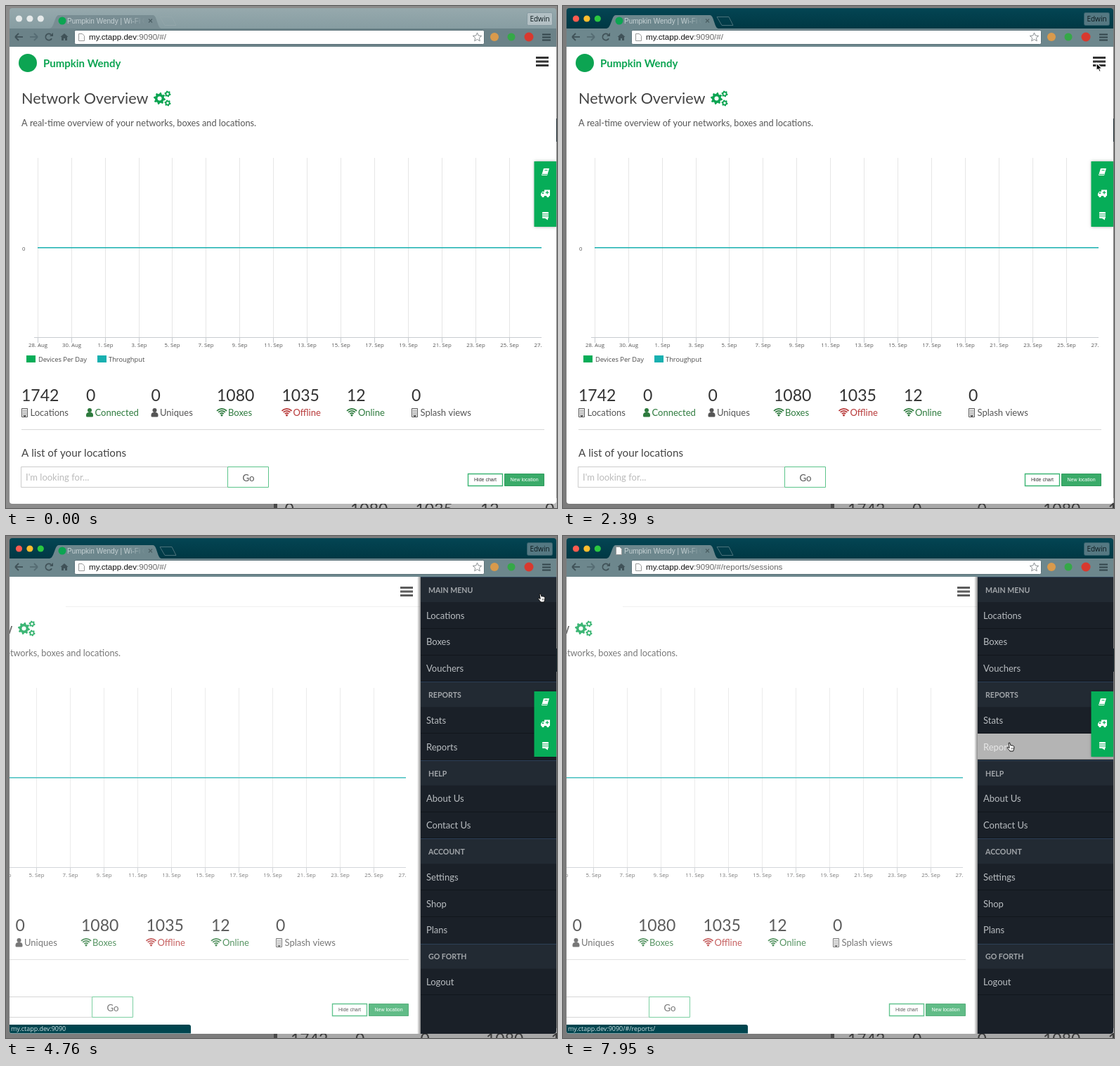
Recreate the animation shown at these times as an HTML page with a canvas. Size 784 by 714 pixels, loop 8000 ms.

```html
<!DOCTYPE html>
<html lang="en">
<head>
<meta charset="utf-8">
<title>Network Overview</title>
<style>
html, body { margin: 0; width: 100%; height: 100%; overflow: hidden; background: #8a8a8a; }
canvas { display: block; width: 784px; height: 714px; }
</style>
</head>
<body>
<canvas id="stage" width="784" height="714"></canvas>
<script>
const ctx = document.getElementById('stage').getContext('2d');
const LOOP = 8000;
const GREEN = '#0ca452', BRIGHT = '#06ad58', TEAL = '#18b0b0';
const LATO = 'Lato, sans-serif', OPEN = '"Open Sans", sans-serif';
const SANS = '"Liberation Sans", Arial, sans-serif';
const BRAND = 'Pumpkin Wendy';
const HOST = 'my.ctapp.dev', PORT = ':9090';

// Stepped timelines: [start ms, value]
const cursorSteps = [
  [0, null], [560, [771, 36, 'arrow']], [750, [764, 52, 'arrow']], [940, [760, 65, 'arrow']],
  [1150, [760, 72, 'arrow']], [1330, [760, 77, 'arrow']], [1700, [759, 81, 'arrow']],
  [3610, [762, 88, 'hand']], [5000, [722, 104, 'hand']], [5250, [688, 116, 'hand']],
  [5500, [672, 140, 'hand']], [5760, [662, 253, 'hand']], [6000, [656, 263, 'hand']],
  [6180, [646, 274, 'hand']], [6450, [637, 300, 'hand']]
];
const slideSteps = [[0, 0], [4490, 57], [4760, 193]];
const statusSteps = [[0, ''], [3930, HOST + PORT], [5250, HOST + PORT + '/#/'], [6000, HOST + PORT + '/#/reports/']];
const backSteps = [[0, 190], [400, null], [1330, 383]];
const rowSteps = {
  Locations: [[5250, '#2b2f38'], [5500, '#b0b0b0'], [5760, '#a0a0a0'], [6000, null]],
  Stats: [[6000, '#2b2f38'], [6180, '#b0b0b0'], [6450, '#a0a0a0'], [6620, null]],
  Reports: [[6450, '#2b2f38'], [6620, '#a0a0a0'], [6860, '#b4b4b4']]
};
const menu = [
  ['MAIN MENU', 'Locations', 'Boxes', 'Vouchers'],
  ['REPORTS', 'Stats', 'Reports'],
  ['HELP', 'About Us', 'Contact Us'],
  ['ACCOUNT', 'Settings', 'Shop', 'Plans'],
  ['GO FORTH', 'Logout']
];
const stats = [
  [22, '1742', 'Locations', building, '#555'],
  [114, '0', 'Connected', person, '#2d7a3d'],
  [206.5, '0', 'Uniques', person, '#555'],
  [300, '1080', 'Boxes', wifi, '#2d7a3d'],
  [392.5, '1035', 'Offline', wifi, '#b83a3a'],
  [485, '12', 'Online', wifi, '#2d7a3d'],
  [577, '0', 'Splash views', building, '#555']
];

function at(steps, t) {
  let value = null;
  for (const [start, v] of steps) if (t >= start) value = v;
  return value;
}
function rect(x, y, w, h, color) {
  ctx.fillStyle = color;
  ctx.fillRect(x, y, w, h);
}
function paint(fill, stroke, width) {
  if (fill) { ctx.fillStyle = fill; ctx.fill(); }
  if (stroke) { ctx.strokeStyle = stroke; ctx.lineWidth = width; ctx.stroke(); }
}
function box(x, y, w, h, r, fill, stroke, width = 1) {
  ctx.beginPath();
  ctx.roundRect(x, y, w, h, r);
  paint(fill, stroke, width);
}
function disc(x, y, r, color) {
  ctx.beginPath();
  ctx.arc(x, y, r, 0, Math.PI * 2);
  paint(color);
}
function poly(points, fill, stroke, width = 1) {
  ctx.beginPath();
  points.forEach(([x, y]) => ctx.lineTo(x, y));
  ctx.closePath();
  paint(fill, stroke, width);
}
function line(x1, y1, x2, y2, color, width = 1) {
  ctx.beginPath();
  ctx.moveTo(x1, y1);
  ctx.lineTo(x2, y2);
  paint(null, color, width);
}
function text(str, x, y, size, color, family = LATO, align = 'left', weight = 400) {
  ctx.font = `${weight} ${size}px ${family}`;
  ctx.fillStyle = color;
  ctx.textAlign = align;
  ctx.fillText(str, x, y);
}
function vertical(y1, y2, from, to) {
  const g = ctx.createLinearGradient(0, y1, 0, y2);
  g.addColorStop(0, from);
  g.addColorStop(1, to);
  return g;
}

function building(x, color) {
  box(x + 0.5, 572.5, 8, 12, 0, null, color);
  for (let r = 0; r < 4; r++)
    for (let c = 0; c < 3; c++) rect(x + 2 + c * 2, 574.5 + r * 2.3, 1.1, 1.3, color);
  rect(x + 3.3, 582, 2.6, 3, color);
}
function person(x, color) {
  disc(x + 5, 575, 3, color);
  box(x, 578, 10, 6.5, [4, 4, 1.5, 1.5], color);
}
function wifi(x, color) {
  for (const r of [3.6, 6.6, 9.6]) {
    ctx.beginPath();
    ctx.arc(x + 7, 582.5, r, -Math.PI * 0.76, -Math.PI * 0.24);
    paint(null, color, 1.8);
  }
  disc(x + 7, 582, 1.5, color);
}
function gear(x, y, r, teeth, hole) {
  const points = [];
  for (let i = 0; i < teeth * 4; i++) {
    const a = (i + 0.5) / (teeth * 4) * Math.PI * 2;
    const d = i % 4 < 2 ? r : r * 0.76;
    points.push([x + Math.cos(a) * d, y + Math.sin(a) * d]);
  }
  poly(points, GREEN);
  disc(x, y, hole, '#fff');
}
function pageIcon(x, y, w, h) {
  poly([[x, y], [x + w - 3, y], [x + w, y + 3], [x + w, y + h], [x, y + h]], '#fafafa', '#999');
}

function drawBackdrop(t, active) {
  rect(0, 0, 784, 714, active ? '#7c7c7c' : '#8c8c8c');
  rect(386, 700, 398, 14, active ? '#a8a8a8' : '#b9b9b9');
  rect(381, 700, 5, 14, '#4a4a4a');
  const shift = at(backSteps, t);
  if (shift !== null) {
    ctx.save();
    ctx.beginPath();
    ctx.rect(387, 700, 397, 14);
    ctx.clip();
    stats.forEach(([x, n]) => text(n, x + shift, 724, 23, '#3c3c3c'));
    ctx.restore();
  }
  rect(783, 160, 1, 33, '#16242b');
}

function drawChrome(t, active) {
  const bar = active ? '#6d878d' : '#6b8288';
  const tab = active ? '#6d878d' : '#788d93';
  box(5, 3, 778, 60, [4, 4, 0, 0], active ? vertical(3, 32, '#044553', '#003844') : vertical(3, 32, '#96a9ad', '#879da2'));
  const lights = active ? ['#ff5b50', '#fdbd2f', '#2bc840'] : ['#e6eaea', '#e6eaea', '#e6eaea'];
  lights.forEach((c, i) => disc(18.5 + i * 15.4, 18, 4.6, c));

  ctx.beginPath();
  ctx.moveTo(62, 32);
  ctx.bezierCurveTo(69, 31, 69, 13, 75, 13);
  ctx.lineTo(209, 13);
  ctx.bezierCurveTo(215, 13, 215, 31, 221, 32);
  paint(tab);
  if (t < 7780) disc(80, 21, 5.5, GREEN);
  else pageIcon(75.5, 15.5, 8, 11);
  const fade = ctx.createLinearGradient(174, 0, 198, 0);
  fade.addColorStop(0, '#c6d1d4');
  fade.addColorStop(1, 'rgba(198,209,212,0)');
  text(BRAND + ' | Wi-Fi On', 87, 25, 10, fade, SANS);
  line(203, 18.5, 208, 23.5, '#4a5e63', 1.1);
  line(208, 18.5, 203, 23.5, '#4a5e63', 1.1);
  poly([[219, 15.5], [236, 15.5], [242, 27.5], [226, 27.5]], null, active ? '#4c717a' : '#93a6aa');

  box(741.5, 9.5, 36, 18, 2, active ? '#557882' : '#b3c0c4', active ? '#33606b' : '#8599a0');
  text('Edwin', 759.5, 22, 10, '#0d1a1e', OPEN, 'center');

  rect(5, 32, 778, 27, bar);
  const icon = '#405258', dim = '#566c73';
  [[13, 1, icon], [45, -1, dim]].forEach(([x, s, c]) => {
    line(x, 44, x + 11 * s, 44, c, 1.8);
    line(x + 5 * s, 39, x, 44, c, 1.8);
    line(x, 44, x + 5 * s, 49, c, 1.8);
  });
  ctx.beginPath();
  ctx.arc(61, 44, 4.6, 0.5, Math.PI * 1.75);
  paint(null, icon, 1.8);
  poly([[62, 43], [67, 43], [67, 38]], icon);
  poly([[77.5, 44], [83, 39], [88.5, 44], [87, 44], [87, 49], [84, 49], [84, 46], [82, 46], [82, 49], [79, 49], [79, 44]], icon);

  box(97.5, 34.5, 583, 20, 2, '#fff', '#5b7178');
  pageIcon(103.5, 39.5, 8, 10);
  const size = 11.6;
  text(HOST, 118, 48, size, '#111', SANS);
  const x = 118 + ctx.measureText(HOST).width;
  text(PORT + '/#/' + (t < 7780 ? '' : 'reports/sessions'), x, 48, size, '#666', SANS);
  const star = [];
  for (let i = 0; i < 10; i++) {
    const a = i * Math.PI / 5 - Math.PI / 2, r = i % 2 ? 3 : 6.5;
    star.push([670.5 + Math.cos(a) * r, 44.5 + Math.sin(a) * r]);
  }
  poly(star, '#fff', '#8a8f92');
  disc(695, 44, 6, '#d99a4c');
  disc(719, 44, 5.5, '#35a848');
  disc(744, 44, 6.5, '#d8392f');
  for (let i = 0; i < 3; i++) rect(763, 39.5 + i * 4, 12, 2, '#34464c');
}

function drawPage(slide) {
  rect(5, 58, 778, 650, '#fff');
  ctx.save();
  ctx.translate(-slide, 0);
  disc(31, 81, 13, GREEN);
  text(BRAND, 53, 87, 15, GREEN, LATO, 'left', 700);
  for (let i = 0; i < 3; i++) rect(754, 72 + i * 5.5, 18, 3, '#333');
  text('Network Overview', 22, 139, 21.6, '#444');
  gear(218.5, 131.5, 8.5, 8, 3);
  gear(230, 125, 4.6, 6, 1.7);
  gear(230, 138, 4.6, 6, 1.7);
  text('A real-time overview of your networks, boxes and locations.', 22, 171, 12.74, '#555');
  drawChart();
  for (const [x, n, label, icon, color] of stats) {
    text(n, x, 561.5, 23, '#333');
    icon(x, color);
    text(label, x + (icon === wifi ? 16 : 12.5), 583, 13, color);
  }
  rect(22, 602, 744, 1, '#d8d8d8');
  text('A list of your locations', 22, 641, 15.2, '#444');
  box(21.5, 655.5, 294, 29, 0, '#fff', '#ccc');
  text("I'm looking for...", 28, 675, 13, '#bbb');
  box(315.5, 655.5, 58, 29, 0, '#fff', '#5cc48a');
  text('Go', 345, 675.5, 13.2, '#555', LATO, 'center');
  box(657.5, 665.5, 49, 17, 0, '#fff', '#3cb573', 1.4);
  text('Hide chart', 682, 676, 7, '#333', SANS, 'center');
  box(709.5, 665.5, 56, 17, 0, '#3aab69', '#2f9c5d');
  text('New location', 737.5, 676, 7, '#fff', SANS, 'center');
  ctx.restore();
  if (slide === 193) {
    rect(5, 58, 585, 650, 'rgba(255,255,255,0.2)');
    rect(85, 100, 504, 1, '#f0f0f0');
  }
}
function drawChart() {
  for (let i = 0; i < 15; i++) {
    const x = Math.round(44.72 + i * 47.93);
    const day = 28 + i * 2;
    rect(x, 216, 1, 255, '#e6e6e6');
    rect(x, 471, 1, 8, '#c8ccd0');
    text(day <= 30 ? day + '. Aug' : day - 31 + '. Sep', x + 0.5, 485, 7.8, '#555', OPEN, 'center');
  }
  text('27.', 757, 485, 7.8, '#555', OPEN, 'center');
  rect(40, 471, 722, 1, '#c8ccd0');
  text('0', 23, 348, 7.8, '#555', OPEN);
  line(45, 343.8, 762, 343.8, TEAL, 1.5);
  rect(29, 497, 13, 10, BRIGHT);
  text('Devices Per Day', 46, 506, 9.3, '#4a4a4a', OPEN);
  rect(130, 497, 13, 10, TEAL);
  text('Throughput', 146, 506, 9.3, '#4a4a4a', OPEN);
}

function drawMenu(t, slide) {
  if (!slide) return;
  const left = 783 - slide;
  const shadow = ctx.createLinearGradient(left - 5, 0, left, 0);
  shadow.addColorStop(0, 'rgba(0,0,0,0)');
  shadow.addColorStop(1, 'rgba(0,0,0,0.45)');
  rect(left - 5, 58, 5, 650, shadow);
  rect(left, 58, slide, 650, '#1a2028');
  let y = 58;
  for (const [title, ...items] of menu) {
    rect(left, y, slide, 36, '#222a33');
    rect(left, Math.round(y), slide, 1, '#2d4058');
    text(title, left + 11, Math.round(y + 22.8), 10.6, '#a2a6aa', LATO, 'left', 700);
    y += 36;
    for (const item of items) {
      const shade = at(rowSteps[item] || [], t);
      const lit = shade && shade !== '#2b2f38';
      if (shade) rect(left, y, slide, 36.8, shade);
      rect(left, Math.round(y + 36.8), slide, 1, '#11161c');
      text(item, left + 8, Math.round(y + 23.6), 13, lit ? '#e6e6e6' : '#b9bdc1');
      y += 37.75;
    }
  }
}

function drawDock() {
  ctx.save();
  ctx.shadowColor = 'rgba(0,0,0,0.35)';
  ctx.shadowBlur = 4;
  rect(751.5, 221, 31.5, 93, BRIGHT);
  ctx.restore();
  poly([[765, 231], [773, 231], [770, 241], [762, 241]], '#fff');
  line(763, 239.5, 770, 239.5, BRIGHT, 0.9);
  line(766.5, 233.5, 770.5, 233.5, BRIGHT, 0.9);
  rect(766, 261.5, 8, 8.5, '#fff');
  poly([[761, 270], [761, 267], [763, 264], [766, 264], [766, 270]], '#fff');
  rect(762.8, 265.2, 2.2, 1.8, BRIGHT);
  disc(764, 270.5, 1.8, '#fff');
  disc(771, 270.5, 1.8, '#fff');
  rect(769.5, 263, 1.2, 4.6, BRIGHT);
  rect(767.8, 264.7, 4.6, 1.2, BRIGHT);
  box(763, 293, 9, 9, 1, '#fff');
  for (let i = 0; i < 3; i++) rect(763, 295 + i * 2.2, 9, 0.7, BRIGHT);
  poly([[767, 302], [771, 302], [771, 304.5]], '#fff');
}

function drawStatus(t) {
  const label = at(statusSteps, t);
  if (!label) return;
  box(5, 695, 258, 12.5, [0, 3, 0, 0], '#00454f');
  text(label, 7, 704, 8.95, '#d5e2e5', OPEN);
}

function drawCursor(t) {
  const cursor = at(cursorSteps, t);
  if (!cursor) return;
  const [x, y, kind] = cursor;
  ctx.save();
  ctx.translate(x, y);
  ctx.lineJoin = 'round';
  if (kind === 'arrow') {
    poly([[0, 0], [0, 11], [2.5, 8.7], [4.3, 12.6], [6.2, 11.7], [4.5, 8], [8, 8]], '#000', '#fff', 1.2);
  } else {
    poly([[-3, -5.5], [-1.4, -6], [0, -2], [2, -2.2], [3.8, -1.4], [5, -0.4], [4.6, 3.2], [3.5, 6], [-1, 6], [-4.8, 1.2], [-4, 0.2], [-1.8, 1.4]], '#fff', '#111', 1);
    line(1.2, 1, 1.4, 3.5, '#333', 0.7);
    line(3, 1, 3, 3.5, '#333', 0.7);
  }
  ctx.restore();
}

function render(now) {
  const t = now % LOOP;
  const active = t >= 2390;
  const slide = at(slideSteps, t);
  drawBackdrop(t, active);
  drawChrome(t, active);
  ctx.save();
  ctx.beginPath();
  ctx.roundRect(5, 58, 778, 650, [0, 0, 4, 4]);
  ctx.clip();
  drawPage(slide);
  drawMenu(t, slide);
  drawDock();
  drawStatus(t);
  ctx.restore();
  drawCursor(t);
}

const begin = performance.now();
function tick() {
  render(performance.now() - begin);
  requestAnimationFrame(tick);
}
tick();
</script>
</body>
</html>
```
